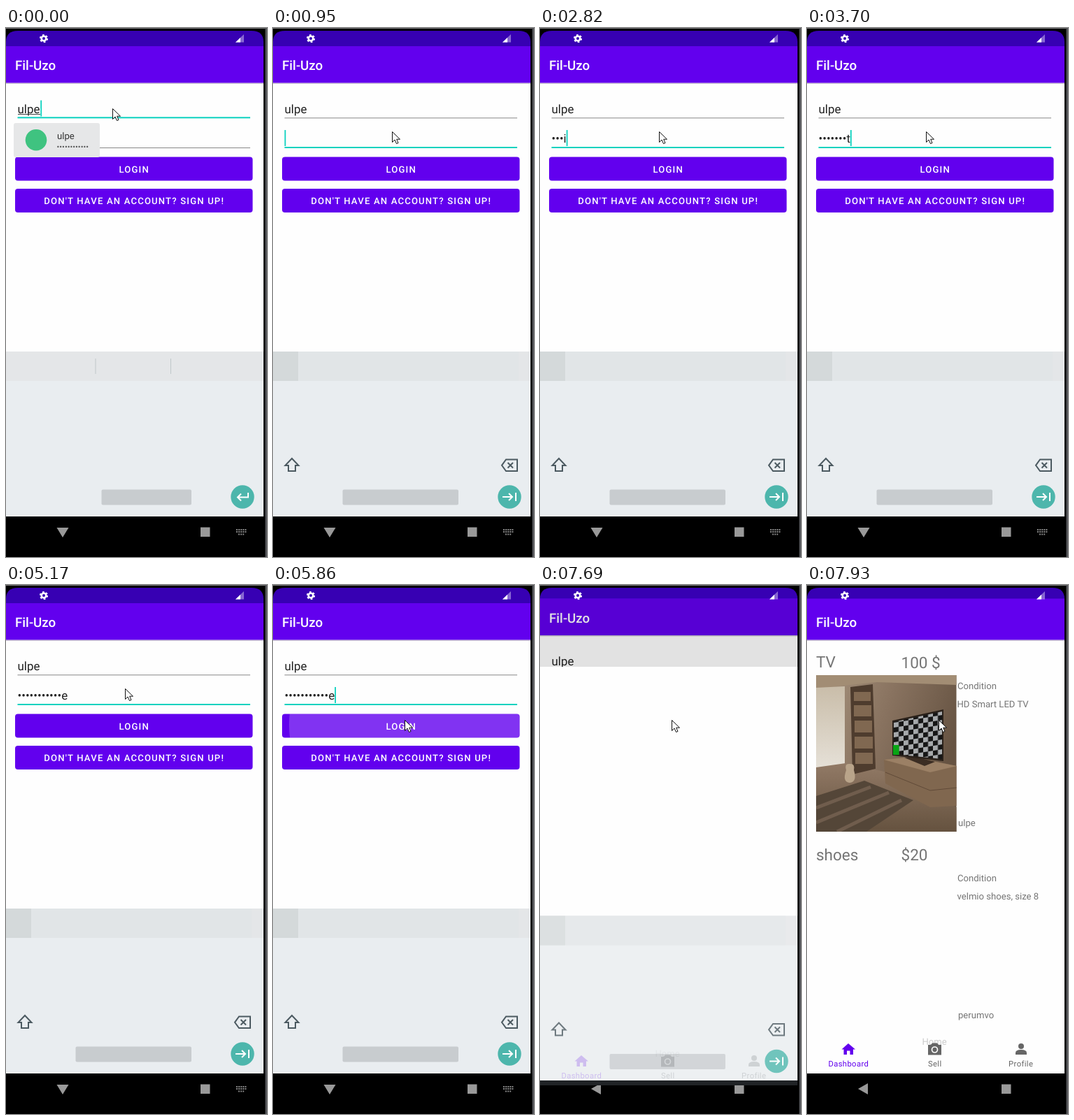
Animation of 373 by 757 pixels, one loop 8 s. Source, as an HTML page:

```html
<!DOCTYPE html>
<html lang="en">
<head>
<meta charset="utf-8">
<title>Login demo</title>
<style>
  html, body { margin: 0; width: 100%; height: 100%; overflow: hidden; background: #000; }
  svg { display: block; width: 100%; height: 100%; }
  text { font-family: Roboto, sans-serif; font-size: 13.1px; fill: #757575; white-space: pre; text-rendering: geometricPrecision; }
  .title { font-size: 18.75px; font-weight: 500; fill: #fff; }
  .input { font-size: 16.9px; fill: #222; }
  .button { font-weight: 500; fill: #fff; letter-spacing: 1.17px; text-anchor: middle; }
  .heading { font-size: 22.5px; }
  .tab { font-size: 11.25px; letter-spacing: .38px; text-anchor: middle; fill: #666; }
  .line { fill: none; stroke: #4c5a61; stroke-width: 2; }
  .teal { fill: #0bd2bf; }
</style>
</head>
<body>
<svg viewBox="0 0 373 757">
  <defs>
    <clipPath id="screen"><path d="M0 20Q0 4 17 4H351Q368 4 368 20V757H0Z"/></clipPath>
    <clipPath id="reveal"><rect id="revealBox" width="368" height="757"/></clipPath>
    <clipPath id="loginShape"><rect x="13" y="184.5" width="339.5" height="34" rx="4"/></clipPath>
    <clipPath id="photo"><rect x="13" y="129" width="200.5" height="224"/></clipPath>
    <linearGradient id="wall" x2="1" y2=".4"><stop stop-color="#a99680"/><stop offset=".5" stop-color="#897360"/><stop offset="1" stop-color="#665342"/></linearGradient>
    <linearGradient id="floor" x2="0" y2="1"><stop stop-color="#927a66"/><stop offset="1" stop-color="#65523f"/></linearGradient>
    <linearGradient id="window" x2="0" y2="1"><stop stop-color="#c9bda9"/><stop offset="1" stop-color="#e6e1d8"/></linearGradient>
    <pattern id="checks" width="14" height="14" patternUnits="userSpaceOnUse" patternTransform="translate(124 197) skewY(-9)">
      <path fill="#161616" d="M0 0H14V14H0Z"/><path fill="#a6a9ab" d="M0 0H7V7H0ZM7 7H14V14H7Z"/>
    </pattern>
    <g id="appBar">
      <path d="M0 78.5H368V80H0Z" fill="#c9c5d0"/>
      <path d="M0 26H368V78.5H0Z" fill="#6200ee"/>
      <text class="title" x="13" y="60">Fil-Uzo</text>
    </g>
  </defs>

  <path d="M0 0H373V1H0Z" fill="#777"/>
  <path d="M370.5 0H373V757H370.5Z" fill="#55565a"/>

  <g clip-path="url(#screen)">
    <path d="M0 4H368V30H0Z" fill="#3700b3"/>

    <g id="login">
      <path d="M0 78H368V720H0Z" fill="#fefefe"/>
      <use href="#appBar"/>
      <text class="input" x="16.5" y="121.5">ulpe</text>
      <rect id="composing" x="17" y="123" width="32" height="1" fill="#444"/>
      <rect id="nameLine" x="16.5" width="332.5"/>
      <rect id="passLine" x="16.5" width="332.5"/>
      <text id="pass" class="input" x="16.5" y="164"></text>
      <rect id="caret" class="teal" width="1.8" height="23"/>
      <rect x="13" y="184.5" width="339.5" height="34" rx="4" fill="#6200ee"/>
      <g clip-path="url(#loginShape)"><circle id="ripple" cx="188" cy="200" fill="#fff" opacity=".2"/></g>
      <text class="button" x="183.2" y="207">LOGIN</text>
      <rect x="13" y="230" width="339.5" height="34" rx="4" fill="#6200ee"/>
      <text class="button" x="183.2" y="252">DON'T HAVE AN ACCOUNT? SIGN UP!</text>
      <g id="account">
        <rect x="11" y="136" width="123" height="49" rx="3" fill="#e6e7e8"/>
        <circle cx="43" cy="160.3" r="15.3" fill="#3fc380"/>
        <text x="73" y="158.5" style="fill:#333">ulpe</text>
        <text x="72.5" y="174" style="fill:#555;font-size:11.25px">••••••••••••</text>
      </g>
      <g id="suggestion">
        <rect x="14.5" y="183" width="180" height="91" rx="2" fill="#ccc" opacity=".6"/>
        <rect x="15" y="182" width="179" height="90" rx="2" fill="#fff"/>
      </g>
    </g>
    <rect id="dim" y="20" width="368" height="100" opacity=".11"/>

    <path d="M0 699H368V757H0Z"/>
    <path d="M278 714.5H291.5V728H278Z" fill="#999"/>
    <path id="back" fill="#999"/>
    <path id="imeKey" d="M329 718H343.5M329 721H343.5M332 724.5H341" stroke="#858585" stroke-width="1.8" stroke-dasharray="2 1.1"/>

    <g clip-path="url(#reveal)"><g id="home">
      <path d="M0 78H368V699H0Z" fill="#fefefe"/>
      <use href="#appBar"/>
      <g id="list">
        <text class="heading" x="13" y="118">TV</text>
        <text class="heading" x="134.5" y="119">100 $</text>
        <text x="215" y="149">Condition</text>
        <text x="214.5" y="174.500">HD Smart LED TV</text>
        <text x="216" y="345">ulpe</text>
        <text class="heading" x="13" y="393.500">shoes</text>
        <text class="heading" x="134.5" y="394">$20</text>
        <text x="215" y="424">Condition</text>
        <text x="214.5" y="449.500">velmio shoes, size 8</text>
        <text x="216" y="620">perumvo</text>
        <g clip-path="url(#photo)">
          <path d="M13 129H214V353H13Z" fill="url(#wall)"/>
          <path d="M13 129H214V143L100 139 13 148Z" fill="#a28d74"/>
          <path d="M13 147L54 145V264H13Z" fill="url(#window)"/>
          <path d="M13 261L55 255 110 267 214 318V353H13Z" fill="url(#floor)"/>
          <path d="M13 302L82 280 152 308 85 353H13Z" fill="#544638"/>
          <path d="M13 319L91 289M13 340L117 297M43 353L135 308" stroke="#877160" stroke-width="5" opacity=".55"/>
          <path d="M62 146L94 142 98 263 65 271Z" fill="#4e3c2e"/>
          <path d="M67 153H91V166H67ZM67 172H92V188H67ZM68 194H93V211H68ZM68 217H94V234H68ZM69 240H94V256H69Z" fill="#806851"/>
          <path d="M56 265q-3-10 5-9q8-1 6 9q5 17-6 18q-11-1-5-18Z" fill="#b9a48a"/>
          <path d="M110 250L150 246 214 259V316L176 318 112 284Z" fill="#80674f"/>
          <path d="M110 250L150 246 214 259 176 268Z" fill="#9b8065"/>
          <path d="M112 268L176 294 214 290" fill="none" stroke="#604a38"/>
          <path d="M139 247L151 245 183 253 168 259Z" fill="#3b2d23"/>
          <path d="M122 194L195 178V252L122 244Z" fill="#2a211a"/>
          <path d="M124 196L193 181V249L124 242Z" fill="url(#checks)"/>
          <path d="M123 229H131.500V243H123Z" fill="#08a514"/>
        </g>
      </g>
      <text x="164.500" y="658" style="fill:#ccc">Home</text>
      <path d="M59 656L49.500 664.500H52.500V672H57V666.500H61.500V672H66V664.500H69Z" fill="#6200ee"/>
      <path d="M173 658H177L179 655.500H186L188 658H192V672.500H173Z" fill="#666"/>
      <circle cx="182.500" cy="665" r="4" fill="#666" stroke="#fefefe" stroke-width="1.700"/>
      <g fill="#666"><circle cx="306" cy="660" r="4"/><path d="M298 672V669.500Q298 665 306 665T314 669.500V672Z"/></g>
      <text class="tab" x="59.300" y="689" style="fill:#6200ee">Dashboard</text>
      <text class="tab" x="182.700" y="689">Sell</text>
      <text class="tab" x="305.700" y="689">Profile</text>
    </g></g>

    <g id="keyboard">
      <path d="M0 463H368V699H0Z" fill="#e9edf0"/>
      <path d="M0 463H368V505H0Z" fill="#e4e6e8"/>
      <rect id="space" y="660.5" height="22" rx="2" fill="#c8cccf"/>
      <circle cx="338" cy="671" r="16.700" fill="#4db6ac"/>
      <g id="nameKeys">
        <path d="M128 473V495M235.500 473V495" stroke="#c0c8ca"/>
        <path d="M346 665V671.500H331M336 666.500L331 671.500L336 676.500" fill="none" stroke="#fff" stroke-width="2"/>
      </g>
      <g id="passKeys">
        <path d="M0 463H351V505H0Z" fill="#e1e5e7"/>
        <path d="M0 463H36V505H0Z" fill="#d4d9da"/>
        <path class="line" d="M27 616L36.500 626H32V634H22V626H17.500Z"/>
        <path class="line" d="M333 617.500H349V634H333L327 625.800ZM335.500 622L343 629.500M343 622L335.500 629.500"/>
        <path d="M328 671H342M337 666L342 671L337 676M347 665V677" fill="none" stroke="#fff" stroke-width="2"/>
      </g>
    </g>
    <path id="edge" d="M0 709H368V716H0Z" fill="#202326"/>

    <g fill="none" stroke="#fff">
      <circle cx="54" cy="15" r="3.300" stroke-width="2.600"/>
      <circle cx="54" cy="15" r="5.100" stroke-width="2" stroke-dasharray="2.670"/>
    </g>
    <path d="M328 20.500L340 9V20.500Z" fill="#fff" opacity=".4"/>
    <path d="M328 20.500L335 13.800V20.500Z" fill="#fff"/>
  </g>

  <path id="cursor" d="M.5 .5V15.500L4 12L6.500 17.500L9 16.500L6.700 11.200H11.500Z" fill="#fff" stroke="#111"/>
</svg>

<script>
const LOOP = 8000;
const el = {};
document.querySelectorAll('[id]').forEach(node => el[node.id] = node);

// Each step is [start time, value...]; the latest started one applies.
const at = (t, steps) => steps.findLast(step => t >= step[0]).slice(1);
const show = (id, on) => el[id].style.display = on ? '' : 'none';
const set = (id, attrs) => Object.entries(attrs).forEach(([key, value]) => el[id].setAttribute(key, value));

const password = 'Twoitentinoe';
const typing = [[0, 0], [1930, 1], [2380, 2], [2820, 4], [3100, 5], [3400, 6], [3550, 7],
  [3700, 8], [4160, 9], [4310, 10], [4620, 11], [4740, 12]];
const pointer = [[0, 152, 115], [280, 155, 118], [430, 162, 134], [550, 170, 148],
  [5320, 176, 162], [5440, 182, 177], [5590, 186, 187], [5710, 188, 193]];
const accountFade = [[0, 1], [680, .5], [800, 0]];
const suggestionFade = [[0, 0], [1100, .5], [1220, 1], [1930, .7], [2080, 0]];
const rippleSize = [[0, 0], [5860, 165], [6010, 180], [6130, 0]];

function fieldLine(id, y, focused) {
  set(id, { y: focused ? y - 1 : y, height: focused ? 2 : 1, fill: focused ? '#0bd2bf' : '#888' });
}

function drawFields(t) {
  const onPass = t >= 680;
  fieldLine('nameLine', 128.3, !onPass);
  fieldLine('passLine', 171, onPass);
  show('composing', !onPass);

  const [count] = at(t, typing);
  const hidden = t >= 6010 ? count : Math.max(0, count - 1);
  el.pass.textContent = '•'.repeat(hidden) + password.slice(hidden, count);
  const caretX = onPass ? 16.5 + (count ? el.pass.getComputedTextLength() : 0) : 49.3;
  set('caret', { x: caretX, y: onPass ? 146 : 103.5 });
  show('caret', t < 5170 || (t >= 5590 && t < 6010));
}

function draw(t) {
  const leaving = t >= 7690;
  const sliding = leaving && t < 7810;
  const passKeys = t >= 950;

  drawFields(t);
  set('account', { opacity: at(t, accountFade)[0] });
  set('suggestion', { opacity: at(t, suggestionFade)[0] });
  set('ripple', { r: at(t, rippleSize)[0] });

  set('login', { transform: `translate(0 ${leaving ? -6.5 : 0})` });
  show('dim', sliding);
  show('home', leaving);
  set('home', { transform: `translate(0 ${sliding ? 17 : 0})` });
  set('revealBox', { y: sliding ? 117 : 0 });
  show('list', t >= 7930);

  show('keyboard', !leaving || sliding);
  set('keyboard', { opacity: sliding ? .8 : 1, transform: `translate(0 ${sliding ? 10.5 : 0})` });
  show('nameKeys', !passKeys);
  show('passKeys', passKeys);
  set('space', passKeys ? { x: 99.5, width: 165.5 } : { x: 136.5, width: 128.5 });
  show('edge', sliding);
  show('imeKey', !leaving);
  set('back', { d: leaving ? 'M73 721L87 713V729Z' : 'M72.5 715H89.5L81 729Z' });

  const [x, y] = at(t, pointer);
  set('cursor', { transform: `translate(${x} ${y})` });
}

const start = performance.now();
function tick() {
  draw((performance.now() - start) % LOOP);
  requestAnimationFrame(tick);
}
tick();
</script>
</body>
</html>
```
